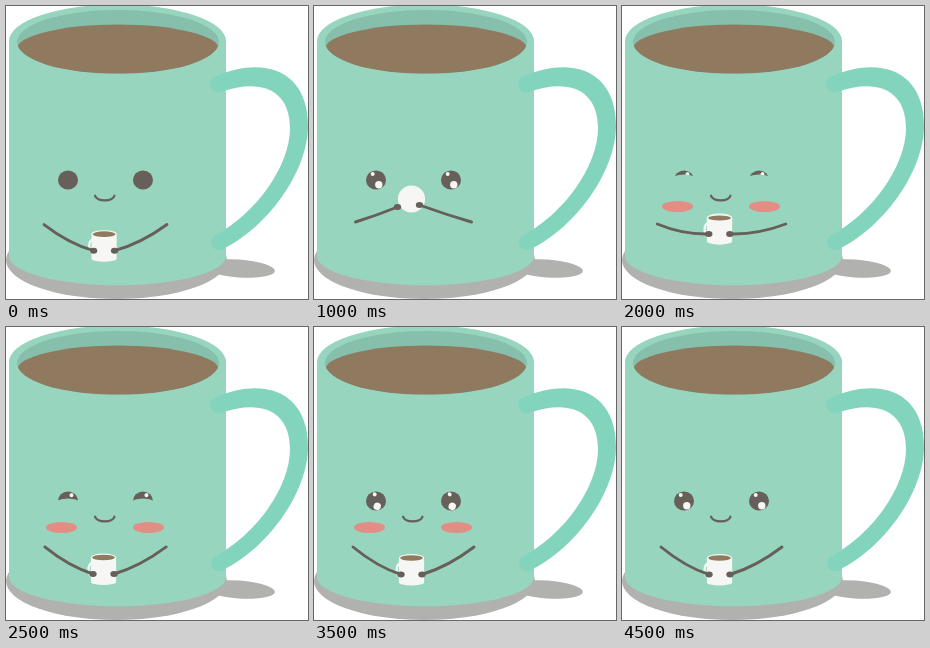
Write an HTML page that moves like this. It is 302x293 px and loops after 5 s.

```html
<!DOCTYPE html>
<html lang="en">
<head>
<meta charset="utf-8">
<title>Sipping mug</title>
<style>
  html, body { margin: 0; width: 100%; height: 100%; overflow: hidden; background: #fff; }
  svg { display: block; width: 100%; height: 100%; }
  .mug { fill: #97d5bf; }
  .handle { fill: #82d5bc; }
  .ink { fill: #675f59; }
  .line { fill: none; stroke: #675f59; stroke-width: 2.9; stroke-linecap: round; }
  .coffee { fill: #8f7a60; }
  .shadow { fill: #b1b1af; }
  .white { fill: #f6f7f4; }
</style>
</head>
<body>
<svg viewBox="0 0 302 293">
  <defs>
    <path id="grip" d="M210 70C258 50 302 64 302 120C302 165 262 222 215 244A8 8 0 0 1 208 230
      C250 208 284 160 284 122C284 84 255 72 215 86A8 8 0 0 1 210 70Z"/>
    <clipPath id="opening"><ellipse cx="112" cy="36" rx="101" ry="32"/></clipPath>
    <clipPath id="front"><rect width="220" height="293"/></clipPath>
  </defs>
  <ellipse class="shadow" cx="110.5" cy="254" rx="110.5" ry="39"/>
  <ellipse class="shadow" cx="233" cy="262.5" rx="36" ry="9" transform="rotate(4 233 262.5)"/>
  <use href="#grip" class="handle"/>
  <path class="mug" d="M3 35A108.5 36.5 0 0 1 220 35V250A108.5 29.2 0 0 1 3 250Z"/>
  <g clip-path="url(#opening)">
    <rect width="220" height="70" fill="#86bfac"/>
    <ellipse class="coffee" cx="112" cy="43" rx="101" ry="24.5"/>
  </g>
  <g id="joints" clip-path="url(#front)"><use href="#grip" class="handle"/></g>
  <g id="eyes"></g>
  <g id="blush" fill="#e28e84">
    <ellipse cx="55.5" cy="200.5" rx="15.5" ry="5.6"/>
    <ellipse cx="142.5" cy="200.5" rx="15.5" ry="5.6"/>
  </g>
  <path class="line" style="stroke-width:2.2" d="M89 189.7C91 196 106.5 196 108.5 189.7"/>
  <ellipse id="cupHandle" fill="none" stroke="#f6f7f4" stroke-width="2.4"/>
  <path id="cup" class="white"/>
  <ellipse id="cupCoffee" class="coffee"/>
  <path id="armL" class="line"/>
  <path id="armR" class="line"/>
  <ellipse id="palmL" class="ink" rx="3.7" ry="3"/>
  <ellipse id="palmR" class="ink" rx="3.7" ry="3"/>
</svg>
<script>
const LOOP = 5000;
const EYE_Y = 174;
const $ = id => document.getElementById(id);
const set = (el, attrs) => { for (const k in attrs) el.setAttribute(k, attrs[k]); };

// Eased 0..1 between two times.
function ramp(time, from, to) {
  const u = Math.min(1, Math.max(0, (time - from) / (to - from)));
  return u * u * (3 - 2 * u);
}
// Eases in from a to b and out again from c to d.
const pulse = (time, a, b, c, d) => ramp(time, a, b) * (1 - ramp(time, c, d));

$("eyes").innerHTML = [62, 137].map(x => `
  <g transform="translate(${x} ${EYE_Y})">
    <ellipse class="ink" rx="10" ry="9.5"/>
    <g class="shine white">
      <circle cx="-3.3" cy="-5.9" r="2"/><circle cx="2.8" cy="4.7" r="3.7"/>
    </g>
    <ellipse class="lid mug" rx="17" ry="9"/>
  </g>`).join("");
const shines = document.querySelectorAll(".shine");
const lids = document.querySelectorAll(".lid");

function drawArm(side, elbowX, elbowY, handX, handY, sag) {
  const midX = (elbowX + handX) / 2, midY = (elbowY + handY) / 2 + sag;
  set($("arm" + side), { d: `M${elbowX} ${elbowY}Q${midX} ${midY} ${handX} ${handY}` });
  set($("palm" + side), { cx: handX, cy: handY });
}

// Tilting shortens the cup until only its round base shows.
function drawCup(x, y, tilt) {
  const r = 12.6 + tilt, rim = 4 + 9.5 * tilt;
  const base = 3 + 10.5 * tilt, foot = y + 24.5 * (1 - tilt);
  set($("cup"), { d: `M${x - r} ${y}A${r} ${rim} 0 0 1 ${x + r} ${y}L${x + r} ${foot}` +
    `A${r} ${base} 0 0 1 ${x - r} ${foot}Z` });
  set($("cupCoffee"), { cx: x, cy: y, rx: 11.4, ry: Math.max(0, 2.8 * (1 - 2 * tilt)) });
  set($("cupHandle"), { cx: x - 11.5, cy: y + 12 * (1 - tilt), rx: 3.4, ry: 6.5 * (1 - tilt) });
}

function drawSip(time) {
  const sipTime = (time + 200) % LOOP; // the lift begins just before the loop point
  const rise = ramp(sipTime, 0, 1200);
  const lift = rise * (1 - ramp(sipTime, 1620, 2780));
  const tilt = lift ** 4;
  const swing = Math.sin(Math.PI * rise);

  const cupX = 97.5 + 2.5 * swing, cupY = 231 - 38 * lift;
  const reach = 60.5 - 2.5 * lift + 5 * Math.sin(Math.PI * lift);
  const elbowY = 220 - 4 * lift - 5 * swing;
  const handY = cupY + 16.5 - 10.5 * tilt;
  const sag = 6 - 5 * tilt;
  drawCup(cupX, cupY, tilt);
  drawArm("L", 99.5 - reach, elbowY, cupX - 10.5 - 3.5 * tilt, handY + 2 * tilt, sag);
  drawArm("R", 99.5 + reach, elbowY, cupX + 10.5 - 2.5 * tilt, handY, sag);
}

function drawFace(time) {
  const squint = pulse(time, 1100, 2000, 2000, 3800);
  const spin = 60 * pulse(time, 1400, 2000, 2800, 3900);
  const shine = pulse(time, 600, 900, 4650, 4950);
  const blush = pulse(time, 1400, 1600, 3900, 4100);
  shines.forEach(el => set(el, { transform: `rotate(${spin})`, opacity: shine }));
  lids.forEach(el => set(el, { cy: 20 - 16.5 * squint }));
  set($("blush"), { opacity: blush });
  // The handle slips behind the mug while the cheeks change colour.
  const fading = blush > .02 && blush < .98;
  set($("joints"), { visibility: fading ? "hidden" : "visible" });
}

const start = performance.now();
function tick() {
  const time = (performance.now() - start) % LOOP;
  drawSip(time);
  drawFace(time);
  requestAnimationFrame(tick);
}
tick();
</script>
</body>
</html>
```
